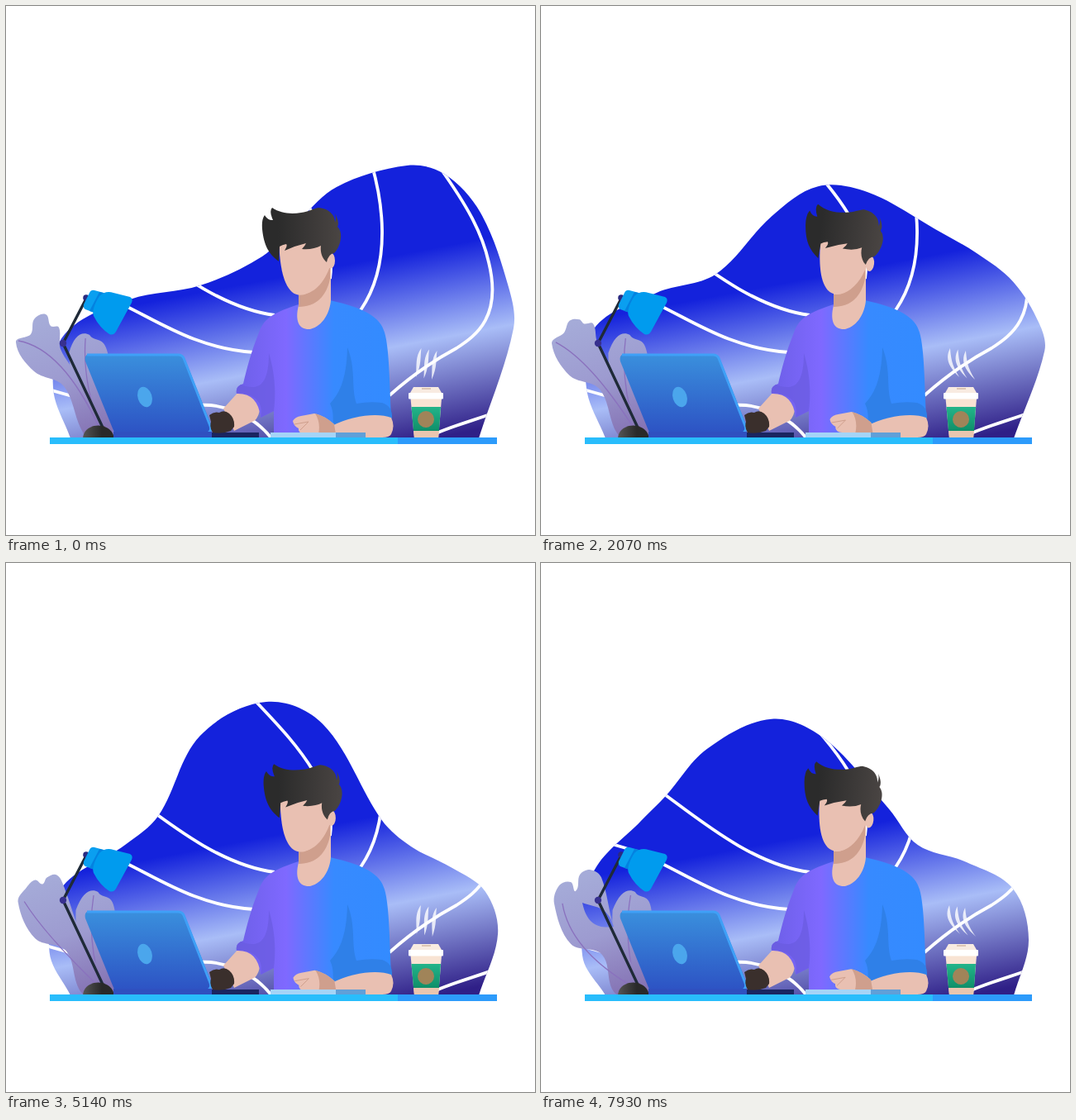
Write an HTML page that moves like this. It is 640x640 px and loops after 8000 ms.

```html
<!DOCTYPE html>
<html lang="en">
<head>
<meta charset="utf-8">
<title>Working at the desk</title>
<style>
  html, body { margin: 0; height: 100%; overflow: hidden; background: #fff; }
  svg { display: block; width: 100vw; height: 100vh; }
</style>
</head>
<body>
<svg viewBox="0 0 640 640">
  <defs>
    <linearGradient id="sky" gradientUnits="userSpaceOnUse" x1="560" y1="285" x2="602" y2="507">
      <stop offset="0" stop-color="#1422dc"/><stop offset=".48" stop-color="#a9bdf7"/><stop offset="1" stop-color="#2f1f87"/>
    </linearGradient>
    <linearGradient id="leaf" gradientUnits="userSpaceOnUse" x1="50" y1="380" x2="95" y2="522">
      <stop offset="0" stop-color="#a5abd8"/><stop offset=".5" stop-color="#9d9bd0"/><stop offset="1" stop-color="#8573b4"/>
    </linearGradient>
    <linearGradient id="shirt" gradientUnits="userSpaceOnUse" x1="285" y1="0" x2="465" y2="0">
      <stop offset="0" stop-color="#6f60ea"/><stop offset=".3" stop-color="#7f69ff"/>
      <stop offset=".62" stop-color="#378aff"/><stop offset="1" stop-color="#338bff"/>
    </linearGradient>
    <linearGradient id="screen" x2="0" y2="1">
      <stop offset="0" stop-color="#3a90dd"/><stop offset="1" stop-color="#2d53c4"/>
    </linearGradient>
    <linearGradient id="hairTone">
      <stop offset=".2" stop-color="#2b2b2b"/><stop offset="1" stop-color="#4a4543"/>
    </linearGradient>
    <linearGradient id="baseTone">
      <stop offset="0" stop-color="#555"/><stop offset=".6" stop-color="#292929"/>
    </linearGradient>
    <linearGradient id="sleeve" x2="0" y2="1">
      <stop offset="0" stop-color="#23b48a"/><stop offset="1" stop-color="#0f8f69"/>
    </linearGradient>
    <clipPath id="blobClip"><path id="blobEdge"/></clipPath>
  </defs>

  <!-- backdrop -->
  <path id="blob" fill="url(#sky)"/>
  <g clip-path="url(#blobClip)" fill="none" stroke="#fff" stroke-width="3.8">
    <path d="M439 180C455 230 469 310 429 368"/>
    <path d="M526 197C560 245 576 275 584 310C600 375 570 398 545 414C515 430 490 448 464 471"/>
    <path d="M518 518C540 508 570 500 597 490"/>
    <path d="M282 145C310 178 345 208 372 252C390 280 396 300 392 330"/>
    <path d="M140 273C190 309 255 365 325 374"/>
    <path d="M80 339C155 354 205 413 300 419"/>
    <path d="M225 484C260 478 300 495 322 524"/>
    <path d="M48 463L80 472"/>
  </g>

  <!-- plant -->
  <g id="leafRight">
    <path d="M76 420C82 398 92 393 101 398C108 408 118 398 123 420L130 521H95C84 490 78 450 76 420Z" fill="url(#leaf)"/>
    <path d="M96 402Q92 455 115 515" fill="none" stroke="#8a71be" stroke-width="1.3"/>
  </g>
  <path id="leafLeft" fill="url(#leaf)"/>
  <path id="gap" d="M50 411C64 417 80 413 88 440C72 442 56 440 50 411Z" fill="url(#sky)"/>
  <path id="veinLeft" fill="none" stroke="#8a71be" stroke-width="1.3"/>

  <!-- lamp -->
  <path d="M97 354L69 408L118 512" fill="none" stroke="#1f2a38" stroke-width="3.4"/>
  <circle cx="69" cy="408" r="4.2" fill="#37308f"/>
  <circle cx="97" cy="353" r="3.8" fill="#2a2a80"/>
  <path d="M94 361L101 347Q103 343 107 344L122 348L107 371L96 367Q93 365 94 361Z" fill="#0a9ff0"/>
  <path d="M113 346L122 348L107 371L101 369Z" fill="#0482e0"/>
  <path d="M113 351Q120 344 130 347L150 352Q154 354 152 359L133 394Q130 399 125 397Q113 389 106 375Q103 367 113 351Z" fill="#009bee"/>
  <path d="M93 523C94 503 128 502 131 523Z" fill="url(#baseTone)"/>

  <!-- laptop -->
  <path d="M102 421H208Q214 421 216 426L249 509Q250 516 244 516H131L96 430Q94 421 102 421Z" fill="url(#screen)"/>
  <path d="M98 422H208Q213 422 215 426L247 508Q249 514 245 516" fill="none" stroke="#3fa0f7" stroke-width="3"/>
  <ellipse cx="168" cy="473" rx="8.5" ry="12.5" transform="rotate(-18 168 473)" fill="#4ba6ec"/>
  <path d="M130 515H249V523H130Z" fill="#2f50c0"/>
  <path d="M249 516H306V522H249Z" fill="#1a2560"/>

  <!-- person -->
  <path d="M282 466L263 487L276 514L300 502Q307 498 309 476Z" fill="#e9c0b2"/>
  <path d="M246 495Q252 490 258 492Q264 488 270 493Q277 499 276 509L272 514Q262 518 250 516Q246 510 248 503Z" fill="#3a2f2c"/>
  <path d="M354 361C325 371 313 376 306 395C296 420 291 440 287 457Q277 460 279 469Q305 468 308 498L324 490V522H410L466 497C464 460 464 415 458 395C453 377 436 366 392 356Z" fill="url(#shirt)"/>
  <path d="M318 420C327 450 326 475 324 490L308 498C312 480 302 469 279 468Q278 461 284 458C305 466 318 460 318 420Z" fill="#6a5ce0" opacity=".7"/>
  <path d="M413 413C412 455 402 470 392 481C398 494 394 500 397 507C420 496 450 492 467 499Q468 484 455 480Q440 478 424 481C417 462 424 440 413 413Z" fill="#2f80e8"/>
  <path d="M354 340V362C349 382 355 392 368 391C384 387 392 370 393 356V300Z" fill="#e9c0b2"/>
  <path d="M354 349C372 350 385 335 392 315V330C388 350 376 364 354 364Z" fill="#cf9f8d"/>
  <g id="head">
    <path d="M330 282C331 310 334 335 346 346C358 356 377 345 386 322L398 285Z" fill="#e9c0b2"/>
    <ellipse cx="393" cy="308" rx="5" ry="9.500" fill="#e9c0b2"/>
    <path d="M330 309C318 300 312 290 310 270Q309 258 313 253Q317 260 323 259Q318 248 322 244C332 251 345 252 357 250C366 249 372 245 378 244C390 245 398 252 398 262Q400 256 398 251Q404 262 401 267Q406 272 405 281C404 290 400 296 397 299Q390 300 388 310C382 305 380 297 381 290Q372 295 358 294Q362 290 363 287Q350 290 337 296Q341 290 339 288Q334 289 331 291Z" fill="url(#hairTone)"/>
  </g>
  <path d="M394 508C420 495 450 492 466 498Q471 508 466 518Q464 522 455 522H390Z" fill="#e9c0b2"/>
  <g id="hand">
    <path d="M347 502Q350 497 357 496L373 493Q386 496 397 506L399 518H362Q353 517 354 511Q348 508 347 502Z" fill="#e9c0b2"/>
    <path d="M374 493Q386 496 397 506L399 518H378Q381 504 374 493Z" fill="#cf9f8d"/>
    <path d="M349 506L366 503L356 513" fill="none" stroke="#cf9f8d"/>
  </g>
  <path d="M320 516H399V522H320Z" fill="#a5d4f7"/>
  <path d="M399 516H435V522H399Z" fill="#609fd8"/>

  <!-- coffee -->
  <path id="steam" fill="#fff" opacity=".8"/>
  <path d="M493 461H523L527 468H489Z" fill="#f8ebe1"/>
  <path d="M503 463H514" stroke="#dcc5b5" stroke-width="2"/>
  <path d="M489.500 475H527L523 523H494Z" fill="#f8e3d3"/>
  <path d="M493 513H524L523 523H494Z" fill="#eac6b0"/>
  <path d="M490.500 485H526L524 514H493Z" fill="url(#sleeve)"/>
  <circle cx="508" cy="500" r="10" fill="#a08459"/>
  <rect x="487" y="468" width="42" height="7.500" rx="1" fill="#fff"/>

  <!-- desk -->
  <path d="M53 522H474V530H53Z" fill="#29bdfc"/>
  <path d="M474 522H594V530H474Z" fill="#2d9bfb"/>
</svg>

<script>
const LOOP = 8000;
const el = id => document.getElementById(id);
const setPath = (id, d) => el(id).setAttribute("d", d);
const setTransform = (id, value) => el(id).setAttribute("transform", value);
const clamp = v => Math.max(0, Math.min(1, v));
const points = text => text.split(" ").map(pair => pair.split(",").map(Number));
const mix = (from, to, k) => from.map((p, i) => p.map((v, c) => v + (to[i][c] - v) * k));

// Key shapes of the backdrop: crest on the right, crest in the middle, tallest, leaning left.
const blobPoses = [
  { time: 0, shape: points("57,462 71,397 150,355 235,338 310,303 350,264 400,219 485,193 530,203 574,250 608,340 614,390") },
  { time: 3070, shape: points("54,462 60,388 135,343 200,318 264,231 328,196 395,229 473,307 525,345 570,374 600,405 607,430") },
  { time: 6030, shape: points("52,475 68,398 148,340 178,300 222,200 309,156 378,180 447,313 475,342 527,367 571,394 590,456") },
  { time: 8000, shape: points("50,475 62,376 120,311 150,281 200,226 278,190 342,214 420,297 455,341 515,362 571,394 590,456") }
];
const leafFolded = points("12,407 30,397 34,379 48,373 54,387 64,389 66,415 88,450 118,515 97,521 70,460 34,442");
const leafOpen = points("16,412 22,390 36,386 42,397 47,377 60,371 73,380 88,440 118,515 90,521 74,474 36,461");
const veinFolded = points("15,405 70,415");
const veinOpen = points("26,412 35,470");

function blobAt(t) {
  const next = Math.max(1, blobPoses.findIndex(pose => pose.time > t));
  const [a, b] = [blobPoses[next - 1], blobPoses[next]];
  return mix(a.shape, b.shape, (t - a.time) / (b.time - a.time));
}

// Smooth curve through the points; an open curve is joined by a straight line.
function spline(pts, closed) {
  const n = pts.length;
  const at = i => closed ? pts[(i + n) % n] : pts[Math.max(0, Math.min(n - 1, i))];
  let d = `M${pts[0]}`;
  for (let i = 0; i < (closed ? n : n - 1); i++) {
    const [before, a, b, after] = [at(i - 1), at(i), at(i + 1), at(i + 2)];
    const reach = Math.hypot(b[0] - a[0], b[1] - a[1]) / 3;
    const handle = (base, from, to, sign) => {
      const span = Math.hypot(to[0] - from[0], to[1] - from[1]);
      return base.map((v, c) => v + sign * reach * (to[c] - from[c]) / span);
    };
    d += `C${handle(a, before, b, 1)} ${handle(b, a, after, -1)} ${b}`;
  }
  return d + "Z";
}

function steamPath(sway) {
  let d = "";
  for (let i = 0; i < 3; i++) {
    const x = 498 + i * 9.5, y = 414 + i * 1.5;
    const top = `${x + 4.5 * sway} ${y}`;
    const bottom = `${x + 4 - 6 * sway} ${y + 35}`;
    const upper = x - 6 + 3 * sway, lower = x - 5 + 4 * sway;
    d += `M${top}C${upper} ${y + 10} ${lower} ${y + 20} ${bottom}`
      + `C${lower + 6} ${y + 20} ${upper + 6} ${y + 10} ${top}Z`;
  }
  return d;
}

function draw(t) {
  const blob = spline([[78, 523], ...blobAt(t), [572, 523]], false);
  setPath("blob", blob);
  setPath("blobEdge", blob);

  const unfold = t / LOOP;
  const [tip, bend] = mix(veinFolded, veinOpen, unfold);
  setPath("leafLeft", spline(mix(leafFolded, leafOpen, unfold), true));
  setPath("veinLeft", `M${tip}Q${bend} 115 515`);
  setTransform("leafRight", `translate(0 521) skewX(${-6 * Math.sqrt(unfold)}) translate(0 -521)`);
  const gap = Math.sqrt(clamp((t - 5300) / 2400));
  setTransform("gap", `translate(70 430) scale(${gap}) translate(-70 -430)`);

  const nod = Math.abs(Math.sin(Math.PI * t / 4760)) ** 1.3;
  setTransform("head", `rotate(${7 * nod} 365 352)`);
  setTransform("hand", `translate(${2.5 * nod} ${-2 * nod})`);
  setPath("steam", steamPath(Math.cos(2 * Math.PI * t / 5600)));
}

const start = performance.now();
function tick() {
  draw((performance.now() - start) % LOOP);
  requestAnimationFrame(tick);
}
tick();
</script>
</body>
</html>
```
